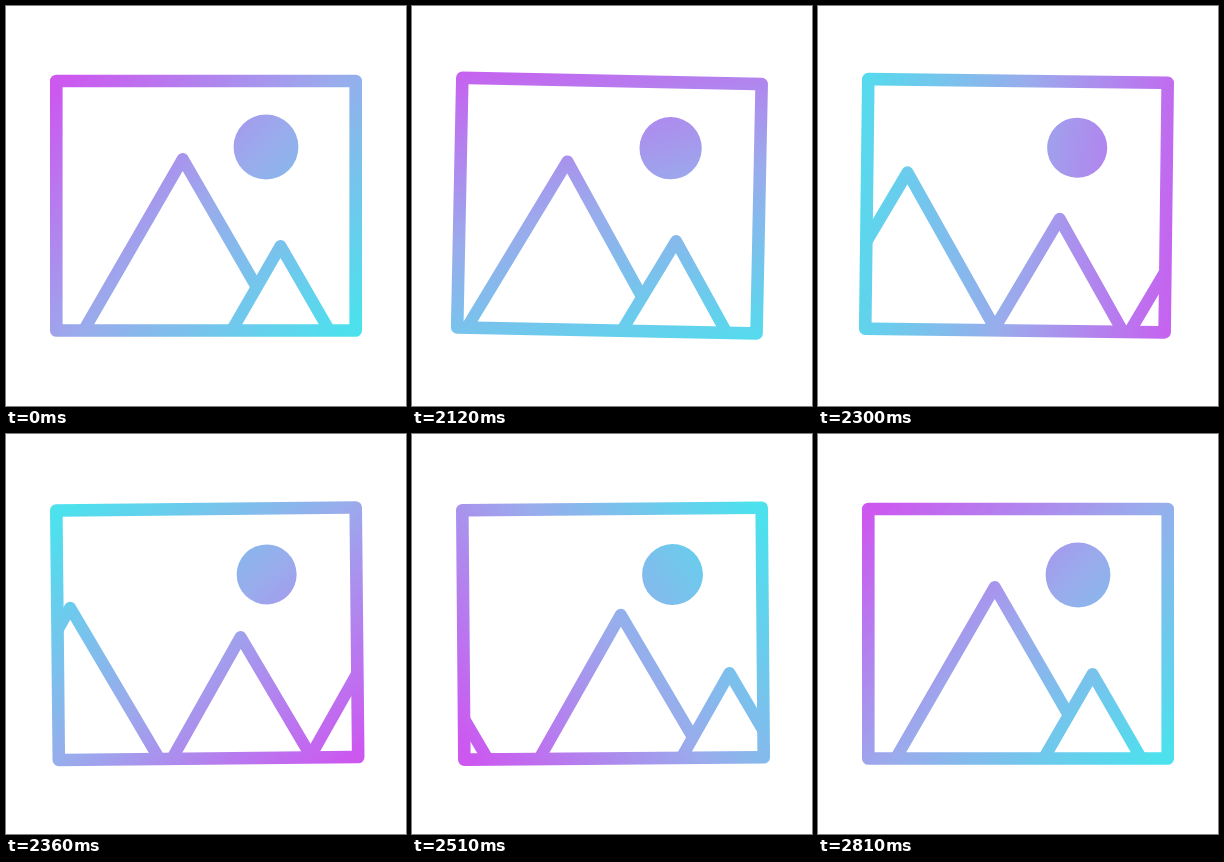
These frames come from a looping animation (400x400 px, 2840 ms). An HTML page with a canvas:

```html
<!DOCTYPE html>
<html lang="en">
<head>
<meta charset="utf-8">
<title>Picture icon</title>
<style>
  html, body { margin: 0; width: 100%; height: 100%; overflow: hidden; background: #fff; }
  canvas { display: block; width: 100vw; height: 100vh; }
</style>
</head>
<body>
<canvas id="stage" width="400" height="400"></canvas>
<script>
const ctx = document.getElementById('stage').getContext('2d');
const LOOP = 2840, HOLD = 2030, STEP = 30, STEPS = 27;
const BOX = { x: 50.3, y: 75, w: 299.4, h: 249.5 };
const FLOOR = BOX.y + BOX.h;
const SLOPE = Math.tan(Math.PI / 6);

// Swing of the picture around its top edge: [step, degrees]
const SWING = [[0, 0], [7, 1.95], [14, -1.2], [20.5, 0.45], [27, 0]];

const smooth = p => p * p * (3 - 2 * p);
const mix = (a, b, p) => a + (b - a) * p;

function swingAt(k) {
  let i = 1;
  while (i < SWING.length - 1 && k > SWING[i][0]) i++;
  const [k0, a] = SWING[i - 1], [k1, b] = SWING[i];
  return mix(a, b, smooth((k - k0) / (k1 - k0))) * Math.PI / 180;
}

function gradient(angle) {
  const dx = Math.cos(angle) * 188, dy = Math.sin(angle) * 188;
  const g = ctx.createLinearGradient(200 + dx, 200 + dy, 200 - dx, 200 - dy);
  g.addColorStop(0, 'rgb(204,88,240)');
  g.addColorStop(0.5, 'rgb(154,171,236)');
  g.addColorStop(1, 'rgb(76,225,237)');
  return g;
}

function mountain(x, y) {
  const half = (FLOOR - y) * SLOPE;
  ctx.beginPath();
  ctx.moveTo(x - half, FLOOR);
  ctx.lineTo(x, y);
  ctx.lineTo(x + half, FLOOR);
  ctx.fillStyle = '#fff';
  ctx.fill();
  ctx.stroke();
}

function draw(k) {
  const p = k / STEPS;
  const slide = 0.85 * smooth(p) + 0.15 * p;
  const early = 1 - Math.pow(1 - p, 1.2);
  const paint = gradient(Math.PI * (1.25 + 2 * smooth(early)));

  ctx.clearRect(0, 0, 400, 400);
  ctx.save();
  ctx.translate(200, BOX.y);
  ctx.rotate(swingAt(k));
  ctx.translate(-200, -BOX.y);
  ctx.lineJoin = 'round';
  ctx.strokeStyle = paint;

  ctx.save();
  ctx.beginPath();
  ctx.rect(BOX.x, BOX.y, BOX.w, BOX.h);
  ctx.clip();
  ctx.lineWidth = 12;
  mountain(mix(176.7, -93, slide), mix(153, 199, slide));
  mountain(mix(274.5, 176.7, slide), mix(240, 153, slide));
  mountain(mix(405, 274.5, slide), 240);
  ctx.restore();

  ctx.fillStyle = paint;
  ctx.beginPath();
  ctx.arc(260, 141, 32.4 - 2.4 * Math.sin(Math.PI * early), 0, Math.PI * 2);
  ctx.fill();

  ctx.lineWidth = 12.6;
  ctx.strokeRect(BOX.x, BOX.y, BOX.w, BOX.h);
  ctx.restore();
}

const start = performance.now();
function tick() {
  const t = (performance.now() - start) % LOOP;
  draw(t < HOLD ? 0 : Math.min(STEPS, Math.floor((t - HOLD) / STEP) + 1));
  requestAnimationFrame(tick);
}
tick();
</script>
</body>
</html>
```
